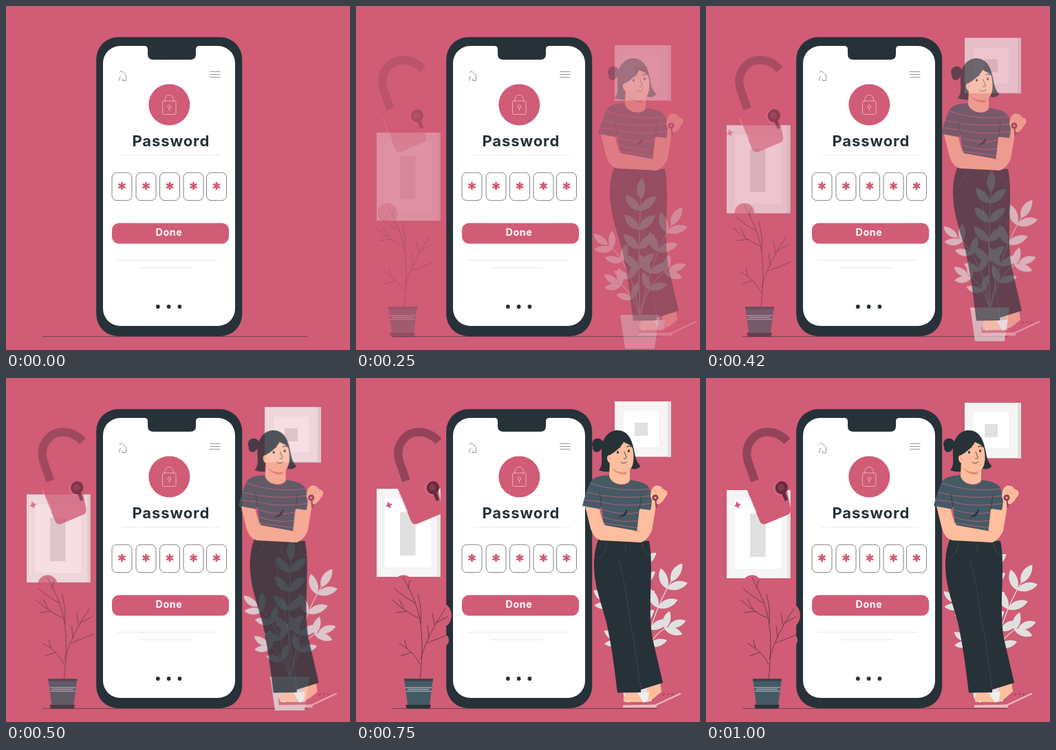
An HTML page for the animation above (1040 ms loop, 500 px wide and 500 px high).

```html
<!DOCTYPE html>
<html lang="en">
<head>
<meta charset="utf-8">
<title>Password</title>
<style>
  html, body { margin: 0; width: 100%; height: 100%; overflow: hidden; background: #d05c76; }
  svg { display: block; width: 100vw; height: 100vh; }
  text { font-family: Inter, "Open Sans", sans-serif; font-weight: 700; text-anchor: middle; }
  .line { fill: none; stroke-linecap: round; stroke-linejoin: round; }

  /* --x and --y give each part its direction of entry */
  .part { --x: 0; --y: 0; animation: slide 1040ms infinite, fade 1040ms infinite; }
  .rise { --y: 1; }
  .from-left { --x: -1; }
  .from-right { --x: 1; }

  @keyframes slide {
    0%      { transform: translate(calc(var(--x) * 34px), calc(var(--y) * 34px)); animation-timing-function: step-end; }
    7.692%  { transform: translate(calc(var(--x) * 34px), calc(var(--y) * 34px)); animation-timing-function: steps(4); }
    24.038% { transform: translate(calc(var(--x) * 23px), calc(var(--y) * 23px)); animation-timing-function: steps(2); }
    31.731% { transform: translate(calc(var(--x) * 18.3px), calc(var(--y) * 18px)); animation-timing-function: steps(2); }
    40.385% { transform: translate(calc(var(--x) * 13px), calc(var(--y) * 12.3px)); animation-timing-function: steps(4); }
    55.769% { transform: translate(calc(var(--x) * 4.2px), calc(var(--y) * 4px)); animation-timing-function: steps(4); }
    72.115% { transform: none; animation-timing-function: steps(2); }
    79.808% { transform: translate(calc(var(--x) * -.4px), calc(var(--y) * -.4px)); animation-timing-function: steps(4); }
    96.154%, 100% { transform: translate(calc(var(--x) * 2px), calc(var(--y) * 2px)); animation-timing-function: step-end; }
  }
  @keyframes fade {
    0%      { opacity: 0; animation-timing-function: step-end; }
    7.692%  { opacity: .03; animation-timing-function: steps(12); }
    55.769% { opacity: .95; animation-timing-function: step-end; }
    60.577%, 100% { opacity: 1; }
  }
</style>
</head>
<body>
<svg viewBox="0 0 500 500">
  <defs>
    <path id="shirt" d="M368 141C356 142 346 143 341 151C335 163 332 175 329 186L355 190.5L357 186L360 216L408 226L412 190L428 192C431 180 431 165 424 157C418 151 408 150 399 148C397 159 372 158 368 141Z"/>
    <clipPath id="shirt-clip"><use href="#shirt"/></clipPath>
  </defs>
  <rect width="500" height="500" fill="#d05c76"/>
  <path d="M53 480.4H438" stroke="#263238" stroke-width=".6"/>

  <g id="phone">
    <rect x="131.2" y="45.2" width="212" height="434.8" rx="32" fill="#263238"/>
    <path fill="#fff" d="M166 58H201Q206 58 206 63V70Q206 78 214 78H268Q276 78 276 70V63Q276 58 281 58H308A25 25 0 0 1 333 83V440A25 25 0 0 1 308 465H166A25 25 0 0 1 141 440V83A25 25 0 0 1 166 58Z"/>
    <g class="line" stroke="#263238" stroke-width=".5">
      <path d="M165 96.5L168 94.5L174.5 100.5V108.5H169.5V106M165 108.5V104.5Q165 102.5 167 102.5"/>
      <path d="M296.5 95.5H311M296.5 99.5H311M296.5 103.5H311"/>
    </g>
    <circle cx="237.3" cy="143.5" r="30" fill="#d05c76"/>
    <g class="line" stroke="#f3ccd4" stroke-width=".7">
      <rect x="227.5" y="138" width="19.5" height="19.5" rx="2"/>
      <path d="M231 138V135.5A6.2 6.2 0 0 1 243.4 135.5V138M237.3 148.5V152"/>
      <circle cx="237.3" cy="146.2" r="2.3"/>
    </g>
    <text x="239.8" y="204" font-size="22" letter-spacing=".9" fill="#263238">Password</text>
    <path d="M168 216.8H310.5M162 369.5H308M195 380.5H272" stroke="#e6e6e6" stroke-width=".9"/>
    <g id="boxes"></g>
    <rect x="154" y="315.5" width="170" height="30" rx="10" fill="#d05c76"/>
    <text x="237" y="334.3" font-size="14.3" letter-spacing=".6" fill="#fff">Done</text>
    <g fill="#263238"><circle cx="220.8" cy="437" r="2.9"/><circle cx="236.6" cy="437" r="2.9"/><circle cx="252.4" cy="437" r="2.9"/></g>
  </g>

  <g class="part rise">
    <path fill="#f5f5f5" d="M30 161H122.5V289H30Z"/>
    <path fill="#e6e6e6" d="M118 161H122.5V289H118Z"/>
    <path fill="#fff" stroke="#ebebeb" stroke-width=".7" d="M41 174H110V276H41Z"/>
    <path class="line" stroke="#ebebeb" stroke-width=".6" d="M30 161L41 174M118 161L110 174M30 289L41 276M118 289L110 276"/>
    <path fill="#e0e0e0" d="M64 195H86.5V258H64Z"/>
  </g>
  <g class="part rise">
    <path fill="#f5f5f5" d="M376 34H458V114.5H376Z"/>
    <path fill="#e0e0e0" d="M453 34H458V114.5H453Z"/>
    <path fill="#fff" stroke="#ebebeb" stroke-width=".7" d="M388 47H441V101H388Z"/>
    <path class="line" stroke="#ebebeb" stroke-width=".6" d="M376 34L388 47M453 34L441 47M376 114.5L388 101M453 114.5L441 101"/>
    <path fill="#e0e0e0" d="M405 65H424V84H405Z"/>
  </g>

  <g class="part from-left">
    <path fill="#d05c76" d="M59 157L114 135L125 190Q126 197 120 199L89 212Q83 214 80 208Z"/>
    <path class="line" stroke="#f0c5ce" stroke-width=".8" d="M61.5 163L75 194"/>
    <path fill="none" stroke="#92445a" stroke-width="12" d="M73 149.5L63 121C56 98 72 78.5 91 78.5C103 78.5 112 83 120 92"/>
    <circle cx="110" cy="160.5" r="9.5" fill="none" stroke="#e493a4" stroke-width=".8"/>
    <path fill="#67293d" d="M112 150A9.3 9.3 0 0 1 117.5 166.5L121 177L117 179L112.5 169A9.3 9.3 0 0 1 112 150Z"/>
    <circle cx="111" cy="159" r="5" fill="#803a50"/>
    <path fill="#d05c76" d="M46.5 179L49 182.5L53 183L50 186L49.5 190L46.5 187L43 186.5L45.5 183.5Z"/>
  </g>

  <g class="part from-left">
    <g fill="#d05c76">
      <ellipse cx="69" cy="301" rx="14.5" ry="14.5"/>
      <ellipse cx="126" cy="345" rx="12.8" ry="17"/>
      <ellipse cx="123" cy="381" rx="12" ry="11"/>
    </g>
    <g class="line" stroke="#3d2b38" stroke-width=".65">
      <path d="M93 438C97 400 98 365 89 335C84 318 76 305 69 290M92 349Q74 342 53 323M74 339L58 341M70 336L63 322M86 327Q72 320 56 306M94 357Q96 336 90 314M76 305L78 294"/>
      <path d="M94 408Q104 372 130 335M103 385Q118 380 136 372M114 359L111 342M116 356L133 347M106 378L104 360"/>
      <path d="M93 416Q84 397 63 386M80 399L65 404M74 393L71 381"/>
    </g>
    <path fill="#455a64" d="M70 437H112L107 475H75Z"/>
    <path fill="#37474f" d="M70 437H112L111.4 441H70.6Z"/>
    <path stroke="#dfe4e6" stroke-width=".8" d="M72 450H110M75 452.6H106M72.6 455.2H109.4"/>
    <path fill="#263238" d="M72 475H109L107 480.5H74Z"/>
  </g>

  <g class="part rise" id="bush">
    <path fill="#e0e0e0" d="M384 426H441L434 475H391Z"/>
    <path fill="#ebebeb" d="M384 426H441L440 431H385Z"/>
  </g>

  <g class="part from-right">
    <!-- feet and shoes -->
    <path fill="#d05c76" d="M387 466L412 467L437 472V476H388ZM426 477L432 463L444 455L470 458L431 478Z"/>
    <path fill="#ffbe9d" d="M391 452H409L412 464L424 469L426 471H390Q387 467 391 461Z"/>
    <path fill="#ffbe9d" d="M424 448L442 442L444 456L432 466L420 471Z"/>
    <path fill="#f0f0f0" d="M409 457L426 456L424 469L418 472Z"/>
    <path fill="#ecb9c2" d="M388 475.5L437 474.5V479H388Z"/>
    <circle cx="396" cy="470.5" r="1.3" fill="#f0f0f0"/>
    <path class="line" stroke="#ecb9c2" stroke-width="2.4" d="M430 478L471 459"/>
    <path class="line" stroke="#263238" stroke-width=".8" d="M446 461L449 459M453 460L455 458.5M459 461L460 459"/>
    <!-- trousers -->
    <path fill="#263238" d="M353 233L426 237Q429 250 429 275C429 310 425 350 432 383L446 443L414 453V457L380 457.5C376 425 373 397 364 355C356 325 345 300 346 266Q347 246 353 233Z"/>
    <path class="line" stroke="#415057" stroke-width=".7" d="M352 262Q362 257 365 241M428 258Q417 255 416 241M382 266C393 300 396 348 403 375L414 452M392 255V241"/>
    <!-- shirt and arms -->
    <path fill="#ffbe9d" d="M407 188L403 224Q402 239 414 239Q424 236 430 222L436 186L444 177L431 168L427 190Z"/>
    <use href="#shirt" fill="#455a64"/>
    <g clip-path="url(#shirt-clip)" class="line" stroke="#c9657b" stroke-width=".8">
      <path d="M341 153Q380 167 430 161M335 166Q380 178 432 171M330 177L356 180Q388 189 432 182M356 191Q388 201 412 195M358 202Q388 212 412 207M360 211L410 218"/>
    </g>
    <path fill="#263238" d="M380 203Q390 199 394 190Q396 202 380 203Z"/>
    <path class="line" stroke="#263238" stroke-width=".7" d="M357 187L354 168M412 191L415 170"/>
    <path fill="#ffbe9d" d="M333 186.5L354 190.5Q356 204 362 214L412 223Q420 230 414 239L356 236Q346 234 341 219Z"/>
    <path class="line" stroke="#df8b73" stroke-width=".7" d="M362 214L356 208M404 222L414 224"/>
    <!-- hand with key -->
    <path fill="#ffbe9d" d="M428 172Q428 160 436 156L443 157.5L446 161L452 164.5Q454 169 449 174Q445 182 437 185Q430 181 428 172Z"/>
    <path class="line" stroke="#df8b73" stroke-width=".7" d="M438 163L443 168M443 160L448 166M433 162L438 170"/>
    <g class="line" stroke="#983b54">
      <circle cx="435" cy="174" r="3" stroke-width="3"/>
      <path stroke-width="2" d="M435.5 178L436.5 188M437 184.5H438.6"/>
    </g>
    <!-- head -->
    <g fill="#263238">
      <circle cx="351.3" cy="96" r="8.3"/>
      <path d="M345 99Q342 105 349 108Q359 106 357 97Z"/>
      <path d="M357 104C357 86 369 76 380 76C394 76 401 88 404 104C406 117 409 124 413.5 128Q408 135 398 131L369 136Q361 137 353 134C360 125 356 116 357 104Z"/>
    </g>
    <path fill="#ffbe9d" d="M369 119L368 143C373 158 397 157 398 147V126Z"/>
    <path fill="#e58f78" d="M370 129Q379 139 394 136L393 140Q378 142 370 129Z"/>
    <path fill="#ffbe9d" d="M369 112C376 108 385 101 389 93C394 96 400 97 402 102C405 116 404 130 396 135C386 140 374 132 371 124C365 124 362 112 369 112Z"/>
    <g class="line" stroke="#263238">
      <path stroke-width="1.2" d="M376 103Q380 99 384 101M394 100Q397 98 400 100"/>
      <path stroke-width=".8" d="M390 107Q392 113 393.5 116Q392 118 389.5 117M385 122.5Q390 126 394 121.5"/>
    </g>
    <g fill="#263238"><ellipse cx="380.5" cy="108" rx="1.5" ry="2"/><ellipse cx="396.5" cy="106" rx="1.4" ry="2"/></g>
    <path class="line" stroke="#df7d74" stroke-width=".8" d="M367 115Q370 115 370 119"/>
  </g>
</svg>

<script>
  const NS = "http://www.w3.org/2000/svg";
  function add(parent, tag, attrs) {
    const el = document.createElementNS(NS, tag);
    for (const key in attrs) el.setAttribute(key, attrs[key]);
    parent.appendChild(el);
    return el;
  }

  // Password boxes, each holding a six-armed asterisk
  const boxes = document.getElementById("boxes");
  for (const x of [168.5, 203.5, 238, 272.5, 306]) {
    add(boxes, "rect", { x: x - 14.5, y: 242.2, width: 29, height: 40.5, rx: 7, fill: "none", stroke: "#263238", "stroke-width": .6 });
    for (const turn of [0, 60, 120])
      add(boxes, "path", { d: `M${x} 255.8V267.2`, stroke: "#d05c76", "stroke-width": 2.8, transform: `rotate(${turn} ${x} 261.5)` });
  }

  // Bush: stems are quadratic curves carrying pairs of leaves
  const bush = document.getElementById("bush");
  function leaf(x, y, angle, len) {
    const w = len * .29;
    add(bush, "path", {
      d: `M0 0C${len * .25} ${-w} ${len * .7} ${-w} ${len} 0C${len * .7} ${w * .8} ${len * .25} ${w * .8} 0 0Z`,
      fill: "#e0e0e0", transform: `translate(${x} ${y}) rotate(${angle})`
    });
  }
  function stem([ax, ay, bx, by, cx, cy], pairs, len) {
    add(bush, "path", { d: `M${ax} ${ay}Q${bx} ${by} ${cx} ${cy}`, class: "line", stroke: "#e0e0e0", "stroke-width": 1.3 });
    const at = (a, b, c, t) => (1 - t) ** 2 * a + 2 * t * (1 - t) * b + t * t * c;
    const slope = (a, b, c, t) => (1 - t) * (b - a) + t * (c - b);
    for (let i = 0; i <= pairs; i++) {
      const t = i === pairs ? 1 : .4 + .5 * i / (pairs - 1);
      const x = at(ax, bx, cx, t), y = at(ay, by, cy, t);
      const angle = Math.atan2(slope(ay, by, cy, t), slope(ax, bx, cx, t)) * 180 / Math.PI;
      if (i === pairs) leaf(x, y, angle, len);
      else for (const side of [-46, 46]) leaf(x, y, angle + side, len);
    }
  }
  stem([413, 428, 409, 340, 414, 258], 4, 31);
  stem([414, 424, 428, 345, 458, 296], 3, 31);
  stem([414, 424, 426, 372, 454, 362], 2, 27);
  stem([412, 424, 400, 350, 366, 324], 3, 26);
  stem([412, 426, 402, 392, 382, 380], 2, 25);
</script>
</body>
</html>
```
